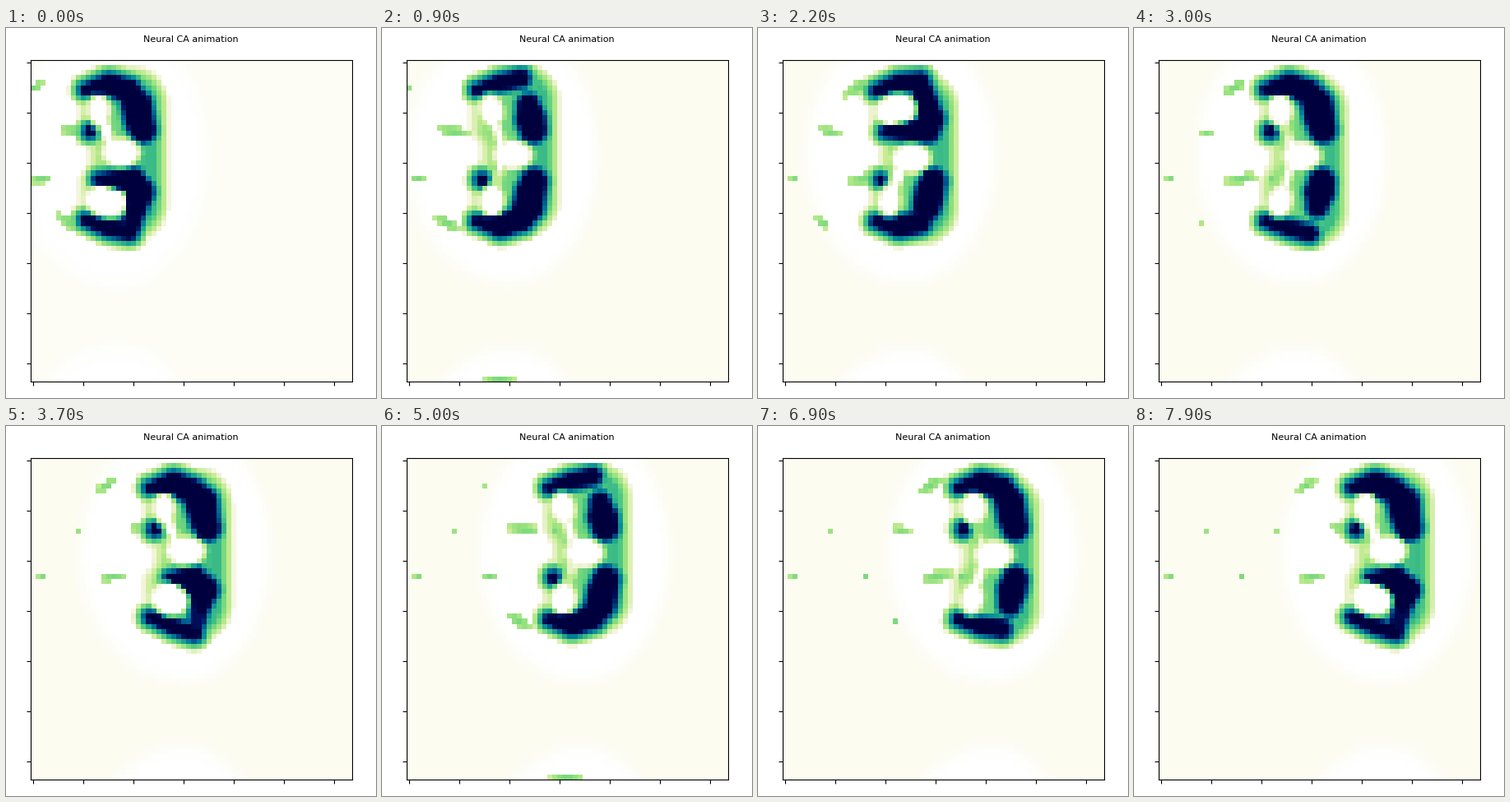
Write a matplotlib script that moves like this. It is 450 px wide and 450 px high and loops after 8000 ms.

```python
import numpy as np
import matplotlib.pyplot as plt
from matplotlib.animation import FuncAnimation
from matplotlib.colors import LinearSegmentedColormap

SIZE, N = 450, 64
LEFT, TOP, SIDE = 30.1, 39.15, 390.7
CELL = SIDE / N
FRAMES, STEP = 80, 100
SPEED = 21.3            # glider drift, px per second
PERIOD = 4.1            # seconds per full wobble
AXIS = 155.2            # glide-reflection axis, px

STOPS = [(0, "#ffffff"), (0.02, "#fcfcf0"), (0.1, "#f1f3d6"),
         (0.2, "#c8ed94"), (0.33, "#94e17d"), (0.45, "#55cd82"),
         (0.58, "#23aa8c"), (0.7, "#00829b"), (0.8, "#00508c"),
         (0.9, "#000f5a"), (1, "#00003e")]
CMAP = LinearSegmentedColormap.from_list("pond", STOPS, N=1024)

rows, cols = np.mgrid[0:N, 0:N].astype(float)
px, py = LEFT + CELL * (cols + 0.5), TOP + CELL * (rows + 0.5)
grain = np.random.default_rng(4).random((N, N))


def unit(v):
    return np.clip(v, 0, 1)


def wave(angle, peak):
    return np.cos(angle - np.radians(peak))


def pulse(angle, peak, sharp):
    """Smooth periodic bump, 1 at the peak."""
    return np.exp(sharp * (wave(angle, peak) - 1))


def stroke(x, y, a, b):
    """Signed distance to a tapered capsule."""
    dx, dy = b[0] - a[0], b[1] - a[1]
    p = unit(((x - a[0]) * dx + (y - a[1]) * dy) / (dx * dx + dy * dy + 1e-6))
    d = np.hypot(x - a[0] - p * dx, y - a[1] - p * dy)
    return d - (a[2] + p * (b[2] - a[2]))


def ellipse(x, y, cx, cy, rx, ry, tilt=0):
    c, s = np.cos(tilt), np.sin(tilt)
    u, v = x - cx, y - cy
    r = np.hypot((u * c + v * s) / rx, (v * c - u * s) / ry)
    return (r - 1) * min(rx, ry)


def lobe(x, y, angle, mid):
    """Dark core, glow, hole and top edge of the upper lobe."""
    lift = wave(angle, 125)
    split = pulse(angle, 80, 4)
    shut = pulse(angle, 175, 2)
    reach = pulse(angle, 152, 4)

    tip = (96, 75 + 3 * reach, 3)
    arch = (125, 68 - 2 * lift, 8 - 2.5 * lift)
    crown = (150, 70 - 12 * lift, 9 - 3 * lift)
    shoulder = (159, 93, 12 - 4 * lift)
    blob = (162, 111, 14)
    heel = (166 - 18 * reach, 124, 12)
    spot = (102 + 18 * reach, 126, 4 - 14 * split)
    neck, link = 1 - split, min(1, 1.3 * shut)

    core, glow = np.zeros((N, N)), np.zeros((N, N))
    for a, b, s in [(tip, arch, 1), (arch, crown, 1),
                    (crown, shoulder, neck), (shoulder, blob, 1),
                    (blob, heel, 1), (heel, spot, link), (spot, spot, 1)]:
        d = stroke(x, y, a, b)
        core = np.maximum(core, s * unit(1 - d / 5))
        glow = np.maximum(glow, s * unit(1 - d / 19))

    cx, cy, w = 113 + 9 * shut, 100, 7 - 16 * shut
    tilt = -0.4 * pulse(angle, 130, 1.5)
    d = np.minimum(ellipse(x, y, cx, cy, 13 + 13 * shut, 20, tilt),
                   stroke(x, y, (cx, cy, w), (130, mid, w)))
    return core, glow, unit(0.5 - d / 7), 44.5 - 6 * wave(angle, 70)


def shell(x, y, top, bottom):
    """Rounded body, pinched on the left at the waist."""
    x = x - 12 * np.exp(-((y - AXIS) / 22) ** 4) * (x < 140)
    r = 50
    qx = np.abs(x - 142) - (59 - r)
    qy = np.abs(y - (top + bottom) / 2) - ((bottom - top) / 2 - r)
    d = (np.hypot(np.maximum(qx, 0), np.maximum(qy, 0))
         + np.minimum(np.maximum(qx, qy), 0) - r)
    return (0.3 + 0.22 * unit((x - 100) / 75)) * unit(-d / 20)


def flake(t, born, life, cx, cy, w, h, slope=0, rest=0):
    """Ragged patch that shrinks towards a resting size."""
    age = t - born
    if age <= 0 or (age >= life and not rest):
        return np.zeros((N, N))
    k = min(1, age / 0.4) * max(rest, np.sqrt(max(0, 1 - age / life)))
    y = rows - cy - slope * (cols - cx)
    r = np.hypot((cols - cx) / (w * k + 0.2), y / (h * k + 0.2))
    return np.where(r < 1 - 0.25 * grain, 0.38 - 0.2 * r * r, 0)


def debris(t):
    """Each half period sheds one flake at the waist and one at a corner."""
    out = np.zeros((N, N))
    for k in range(-1, 5):
        born, flip = (k / 2 - 0.2) * PERIOD, k % 2
        sign = 1 - 2 * flip
        waist, corner = (18.4 - 4.7 * sign, 18.4 + 13.5 * sign)
        shed = [flake(t, born, 4.4, 8.8 + 7.1 * k, waist, 4.7, 1.4,
                      0.15 * sign, 0.2),
                flake(t, born + 0.3, 3.6, 7.5 + 7.15 * k, corner, 3.6, 1.6,
                      0.5 * sign)]
        if not flip:
            shed.append(flake(t, born + 1.2, 1.6, 18 + 6.7 * k, 63, 4, 0.9))
        out = np.maximum.reduce([out, *shed])
    return out


def haze(x, t):
    dx = x - 137
    dy = (py - AXIS + SIDE / 2) % SIDE - SIDE / 2
    r = np.hypot(dx / np.where(dx < 0, 126, 106), dy / 156)
    return (0.012 + 0.008 * min(1, t / 0.9)) * unit((r - 0.9) / 0.2)


def field(t):
    x, angle = px - SPEED * t, 2 * np.pi * t / PERIOD
    mid = AXIS - 4 * np.cos(angle)
    core, glow, hole, top = lobe(x, py, angle, mid)
    core2, glow2, hole2, low = lobe(x, 2 * AXIS - py, angle + np.pi,
                                    2 * AXIS - mid)
    gap = unit(0.5 - ellipse(x, py, 140, mid, 24, 18) / 7)
    hole = np.maximum.reduce([hole, hole2, gap])
    v = np.maximum.reduce([shell(x, py, top, 2 * AXIS - low), glow, glow2])
    v = np.maximum.reduce([v * (1 - hole), core, core2])
    v[0] = 0
    v = np.maximum(v, debris(t))
    return np.where(v < 0.06, haze(x, t), v)


fig = plt.figure(figsize=(SIZE / 100, SIZE / 100), dpi=100, facecolor="white")
ax = fig.add_axes([LEFT / SIZE, 1 - (TOP + SIDE) / SIZE,
                   SIDE / SIZE, SIDE / SIZE])
ax.tick_params(labelbottom=False, labelleft=False)
image = ax.imshow(field(0), cmap=CMAP, vmin=0, vmax=1, interpolation="nearest")
ax.set_xticks(range(0, N, 10))
ax.set_yticks(range(0, N, 10))
fig.text(0.5, 1 - 17.3 / SIZE, "Neural CA animation", ha="center",
         va="baseline", fontsize=8, family="DejaVu Sans")


def draw(i):
    image.set_data(field(i * STEP / 1000))
    return [image]


anim = FuncAnimation(fig, draw, frames=FRAMES, interval=STEP, repeat=True,
                     repeat_delay=0)
plt.show()
```
